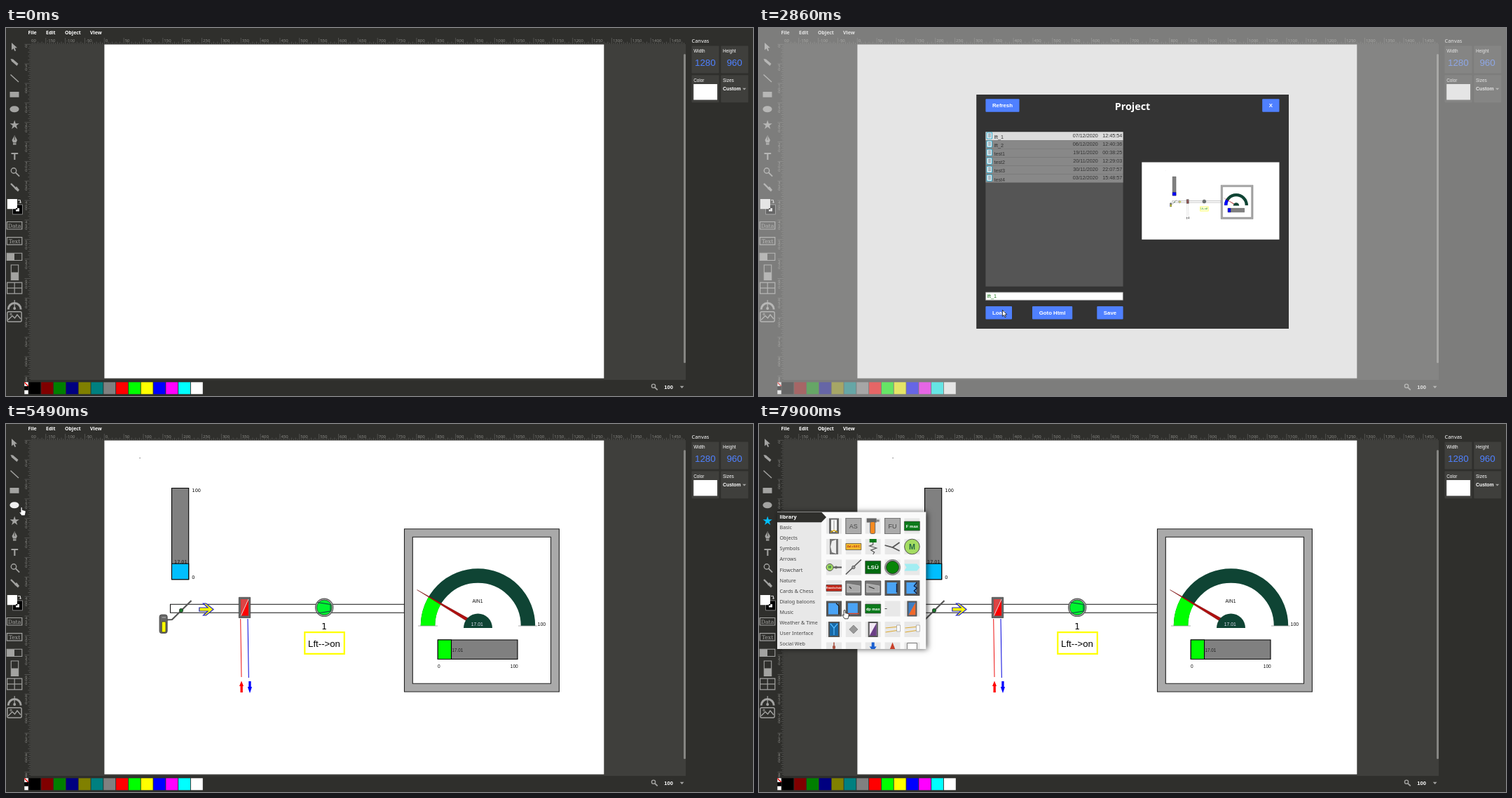
These frames come from a looping animation (1066 px wide and 525 px high, 8 s). An HTML page with a canvas:

```html
<!DOCTYPE html>
<html lang="en">
<head>
<meta charset="utf-8">
<title>Drawing editor</title>
<style>
html, body { margin: 0; width: 100%; height: 100%; overflow: hidden; background: #2f2f2c; }
canvas { display: block; }
</style>
</head>
<body>
<canvas width="1066" height="525"></canvas>
<script>
const c = document.querySelector('canvas').getContext('2d');
const NOTO = '"Noto Sans", "Open Sans", sans-serif';
const ARIAL = '"Liberation Sans", Arial, sans-serif';
const DEJA = '"DejaVu Sans", sans-serif';
const DARK = '#2f2f2c', TILE = '#3f3f3c', ICON = '#a3a3a1', BLUE = '#4f80ff', PINE = '#0f4434';
const TAU = Math.PI * 2;

function paint(fill, stroke, lw = 1) {
  if (fill) { c.fillStyle = fill; c.fill(); }
  if (stroke) { c.strokeStyle = stroke; c.lineWidth = lw; c.stroke(); }
}
// rectangle given by two corners
function rect(x, y, x2, y2, fill, stroke, lw, r = 0) {
  c.beginPath();
  c.roundRect(x, y, x2 - x, y2 - y, r);
  paint(fill, stroke, lw);
}
function poly(p, fill, stroke, lw, open) {
  c.beginPath();
  for (let i = 0; i < p.length; i += 2) c.lineTo(p[i], p[i + 1]);
  if (!open) c.closePath();
  paint(fill, stroke, lw);
}
const line = (p, stroke, lw) => poly(p, null, stroke, lw, true);
function oval(x, y, rx, ry, fill, stroke, lw) {
  c.beginPath();
  c.ellipse(x, y, rx, ry, 0, 0, TAU);
  paint(fill, stroke, lw);
}
const circle = (x, y, r, ...style) => oval(x, y, r, r, ...style);
function text(s, x, y, size, color, font = ARIAL, weight = 400, align = 'left') {
  c.font = `${weight} ${size}px ${font}`;
  c.textAlign = align;
  c.fillStyle = color;
  c.fillText(s, x, y);
}
function at(x, y, scale, draw) {
  c.save();
  c.translate(x, y);
  c.scale(scale, scale);
  draw();
  c.restore();
}
function button(label, x, y, x2, fill = BLUE) {
  rect(x, y, x2, y + 18.5, fill, null, 1, 1);
  text(label, (x + x2) / 2, y + 12, 7.8, '#fff', ARIAL, 700, 'center');
}

function rulers() {
  const step = 2.785, x0 = 140.3, y0 = 23.3;
  c.beginPath();
  for (let n = -37; n <= 297; n++) {
    const x = x0 + n * step;
    c.moveTo(x, n % 10 ? (n % 2 ? 21 : 19.5) : 14);
    c.lineTo(x, 23);
  }
  for (let n = 0; n <= 171; n++) {
    const y = y0 + n * step;
    c.moveTo(n % 10 ? (n % 2 ? 33 : 31.5) : 26.5, y);
    c.lineTo(35, y);
  }
  paint(null, '#6b6b68', 0.6);
  for (let n = -3; n <= 29; n++) text(n * 50, x0 + 1.5 + n * step * 10, 19.5, 6, '#8a8a86', NOTO);
  text('00', 36, 19.5, 6, '#8a8a86', NOTO);
  for (let n = 0; n <= 17; n++)
    [...String(n * 50)].forEach((d, k) => text(d, 27.2, y0 + 5 + n * step * 10 + k * 4.6, 5.5, '#8a8a86', NOTO));
}

function star(fill) {
  const p = [];
  for (let i = 0; i < 10; i++) {
    const a = i * Math.PI / 5, r = i % 2 ? 2.7 : 7;
    p.push(12.2 + r * Math.sin(a), 138.4 - r * Math.cos(a));
  }
  poly(p, fill);
}
function lens(x, y, r) {
  circle(x, y, r, null, ICON, 1.4);
  line([x + r * 0.7, y + r * 0.7, x + r * 2.2, y + r * 2.2], ICON, 1.8);
}

function tools(t) {
  poly([8, 21, 8, 31.5, 10.6, 29.3, 12.5, 33, 14.2, 32.2, 12.6, 28.6, 16, 28.3], ICON);
  poly([6.5, 44, 10, 44.5, 17.5, 51, 15.5, 54, 8, 47.5], ICON);
  line([6.5, 66.5, 18, 77], ICON, 1.5);
  rect(5.5, 91, 18.5, 98.8, ICON);
  oval(12, 115.7, 6.6, 4.5, t > 5450 && t < 5660 ? '#f0f0f0' : ICON);
  star(t >= 6040 ? '#00bfff' : t >= 5700 ? '#f0f0f0' : ICON);
  poly([12.2, 153, 16, 160, 14.5, 163.5, 10, 163.5, 8.5, 160], ICON);
  line([12.2, 154, 12.2, 160], DARK, 0.9);
  rect(10, 164.3, 14.5, 166.5, ICON);
  rect(7.5, 178, 17.2, 180, ICON);
  rect(11.3, 178, 13.4, 188, ICON);
  lens(11, 203.5, 3.7);
  line([7, 222, 15, 230], ICON, 2.4);
  poly([12, 229, 15, 226, 19, 231, 17, 233.5], ICON);
  rect(9.5, 252, 23.5, 265.8, '#000', '#999', 0.8);
  rect(1.8, 244, 16, 258.2, '#fff');
  rect(14, 257, 19, 261.5, '#fff');
  rect(14, 257, 16.3, 259, '#000');
  line([17, 245.5, 20.5, 245.5, 20.5, 249], '#ddd', 1);
  poly([19, 248, 22.2, 248, 20.6, 250], '#ddd');
  for (const [s, y] of [['Data', 276.5], ['Text', 298.7]]) {
    rect(1.3, y, 22.8, y + 10.5, null, ICON, 1.2);
    text(s, 12, y + 8.2, 7.8, ICON, '"DejaVu Serif", serif', 400, 'center');
  }
  rect(1.3, 321.3, 22.8, 331.5, null, ICON, 1.1);
  rect(1.3, 321.3, 12, 331.5, ICON);
  rect(7.3, 338, 17.7, 359.5, null, ICON, 1.1);
  rect(7.3, 348.5, 17.7, 359.5, ICON);
  rect(1.6, 363.2, 22.8, 378.8, null, ICON, 1.2);
  line([12.2, 363, 12.2, 379], ICON, 1.2);
  line([1.6, 371, 22.8, 371], ICON, 1.2);
  c.beginPath();
  c.arc(12.2, 401.5, 9, Math.PI, 0);
  paint(null, ICON, 3);
  line([12.2, 401.5, 12.2, 388], ICON, 1.2);
  circle(12.2, 400, 2, ICON);
  rect(1.8, 404.8, 22.2, 419, null, ICON, 1.4, 2);
  line([3, 416.5, 9, 410.5, 12.5, 414, 16, 409, 21, 415], ICON, 1.4);
  circle(7, 408.3, 1.2, null, ICON, 0.9);
}

function editor(t) {
  rect(0, 0, 1066, 525, DARK);
  rect(35, 23, 970, 502, TILE);
  rulers();
  rect(967, 37, 970, 478, '#858582', null, 1, 1.5);
  rect(140.4, 23.5, 853.3, 499.8, '#fff');
  ['File', 'Edit', 'Object', 'View'].forEach((s, i) => text(s, [31.5, 57, 84, 120][i], 8.5, 7, '#fff', NOTO, 600));
  tools(t);

  text('Canvas', 978.5, 21.3, 7.4, '#fff', NOTO);
  [978.5, 1020.3].forEach(x => {
    rect(x, 25.5, x + 39, 64.5, TILE, null, 1, 1);
    rect(x, 67.3, x + 39, 106.3, TILE, null, 1, 1);
  });
  text('Width', 981.2, 34.7, 6.4, '#fff');
  text('Height', 1023, 34.7, 6.4, '#fff');
  text('Color', 981.2, 76.5, 6.4, '#fff');
  text('Sizes', 1023, 76.5, 6.4, '#fff');
  text('1280', 997.8, 53.5, 13.3, BLUE, ARIAL, 400, 'center');
  text('960', 1039.5, 53.5, 13.3, BLUE, ARIAL, 400, 'center');
  rect(981.2, 80, 1015, 102.5, '#fff');
  text('Custom', 1023, 88.7, 6.9, '#fff', ARIAL, 700);
  poly([1051, 85.7, 1056.3, 85.7, 1053.6, 88.5], ICON);

  const colors = ['#000', '#800000', '#008000', '#000080', '#808000', '#008080', '#808080',
    '#f00', '#0f0', '#ff0', '#00f', '#f0f', '#0ff', '#fff'];
  colors.forEach((k, i) => rect(32.5 + i * 17.8, 505.3, 49.4 + i * 17.8, 522.3, k));
  rect(26.3, 505.3, 31.7, 511, '#fff');
  line([26.3, 505.5, 31.7, 511], '#f00', 1.2);
  rect(26.3, 511, 31.7, 516.5, '#000');
  rect(26.3, 516.8, 31.7, 522.3, '#fff');
  lens(924, 510.7, 2.6);
  text('100', 939.3, 514.5, 7.5, '#fff', ARIAL, 700);
  poly([961.7, 510.8, 967.5, 510.8, 964.6, 514], ICON);
}

function menu(hover) {
  c.save();
  c.shadowColor = 'rgba(0,0,0,.5)';
  c.shadowBlur = 5;
  rect(26, 13, 132, 110, '#f5f5f5');
  c.restore();
  rect(26, 0, 50, 14, '#f5f5f5');
  text('File', 31.5, 8.5, 7, '#333', NOTO);
  ['New Document', 'Open Project', 'Import Image', 'Save to Library', 'Export as PNG'].forEach((s, i) => {
    const y = 26 + i * 17.8;
    if (i === hover) rect(26, y - 8.9, 132, y + 8.9, BLUE);
    text(s, 40, y + 2.5, 7.3, i === hover ? '#fff' : '#333', NOTO);
  });
}

function gauge(live) {
  const x = 673.5, y = 288, a = Math.PI * 1.17;
  const band = (from, to, color) => {
    c.beginPath();
    c.arc(x, y, 71.5, from, to);
    paint(null, color, 20.5);
  };
  band(Math.PI, TAU, PINE);
  band(Math.PI, a, live ? '#0f0' : '#00f');
  line([588, 288, 616, 288], '#999', 0.8);
  line([731, 288, 758, 288], '#999', 0.8);
  c.save();
  c.translate(x, y);
  c.rotate(a);
  poly([101, 0, 10, -2.4, 10, 2.4], '#b01010', '#600', 0.4);
  c.restore();
  c.beginPath();
  c.arc(x, 291, 20.5, Math.PI, 0);
  paint(PINE);
  if (live) {
    text('AIN1', 673, 255, 6.8, '#111', ARIAL, 400, 'center');
    text('17.01', 672.3, 288, 6.8, '#dde', ARIAL, 400, 'center');
    text('100', 758.5, 288, 7, '#111');
  }
}

function scene(live) {
  rect(190.5, 48, 191.7, 49, '#555');
  rect(236.5, 91.5, 260.7, 221.7, '#808080', '#000', 1.1);
  rect(236.5, 199.3, 260.7, 221.7, live ? '#00bfff' : '#00f', '#000', 1.1);
  if (live) {
    text('17.01', 249.3, 198.7, 6.5, '#111', DEJA, 400, 'center');
    text('100', 265.5, 97, 6.5, '#000', DEJA);
    text('0', 265.3, 220.5, 6.5, '#000', DEJA);
  }
  rect(234.5, 257.3, 568.5, 269.3, '#fff', '#111', 1.1);

  // damper with its drive
  line([228, 279.5, 237, 279, 264.5, 252], '#555', 2.2);
  circle(250, 266, 2.7, '#1a7a2a', '#333', 0.8);
  rect(219, 272, 230.2, 298.5, '#666', '#444', 0.8, 3);
  rect(222.3, 282, 228, 297, '#ff0', '#333', 0.8, 1);
  line([222.5, 276, 228, 276], '#bbb', 1);

  poly([275.8, 262, 288, 262, 281.5, 256, 285.5, 256, 296, 264.5, 285.5, 273, 281.5, 273, 288, 267, 275.8, 267],
    '#ff0', '#22c', 1.2);

  // heater
  rect(332.3, 247.3, 348.7, 276.5, '#666', '#444', 0.8);
  rect(335.3, 250, 346, 273.5, live ? '#f00' : '#8b3a3a');
  poly([335.3, 250, 346, 250, 335.3, 273.5], live ? '#d44' : '#855');
  line([346, 250, 335.3, 273.5], '#ddd', 1);
  line([334.7, 278, 336, 361], live ? '#e11' : '#888', 1);
  line([345, 278, 346.3, 362], live ? '#00d' : '#888', 1);
  poly([336, 366.5, 339, 374, 337.8, 374, 337.8, 383, 334.5, 383, 334.5, 374, 333, 374], live ? '#f00' : '#222');
  poly([348, 384, 351, 375, 349.6, 375, 349.6, 367, 346.3, 367, 346.3, 375, 344.8, 375], live ? '#00f' : '#222');

  // fan
  circle(454.2, 261.8, 12.7, '#bbb', '#555', 1.1);
  circle(454.2, 261.8, 10.8, live ? '#00f52f' : '#777', '#333', 0.8);
  line([444.5, 254.5, 463, 257.5, 463, 267, 444.5, 270], '#144', 1.1);
  if (live) text('1', 454, 293, 12, '#000', DEJA, 400, 'center');
  rect(426.3, 297.2, 482.8, 327.8, live ? '#fff' : '#ffd', '#ff0', 2.2);
  text(live ? 'Lft-->on' : 'Lft-->off', 454, 317.5, 13.2, live ? '#000' : '#080', ARIAL, 400, 'center');

  rect(568.5, 149.7, 789.4, 382, '#a9a9a9', '#222', 1.1);
  rect(580.3, 161.3, 777.5, 370.3, '#fff', '#222', 1.1);
  gauge(live);
  rect(616.3, 308, 730, 335.5, '#808080', '#000', 1.1);
  rect(616.3, 308, 635.5, 335.5, live ? '#0f0' : '#00f', '#000', 1.1);
  if (live) {
    text('17.01', 636.5, 325, 6.3, '#222');
    text('0', 616, 347.7, 6.5, '#111');
    text('100', 730.7, 347.7, 6.5, '#111', ARIAL, 400, 'right');
  }
}

const files = [
  ['lft_1', '07/12/2020', '12:45:54'], ['lft_2', '06/12/2020', '12:40:36'], ['test1', '19/11/2020', '00:38:25'],
  ['test2', '20/11/2020', '12:29:03'], ['test3', '30/11/2020', '22:07:57'], ['test4', '03/12/2020', '15:48:57']];

function project(t) {
  rect(0, 0, 1066, 525, 'rgba(204,204,204,.5)');
  rect(310.2, 95, 756, 429, '#333');
  button('Refresh', 323.4, 101.2, 371.5);
  button('X', 718.2, 101.2, 742.5);
  text('Project', 533, 117, 14.4, '#fff', NOTO, 700, 'center');
  rect(323.4, 148.2, 519.6, 368.7, '#555');
  rect(323.4, 377, 519.4, 388.3, '#fff', '#888', 0.8);
  rect(546.3, 191.6, 742.5, 301.7, '#fff');
  button('Load', 323.4, 397, 361);
  button('Goto Html', 390, 397, 447.2);
  button('Save', 482.3, 397, 519.6);
  if (t >= 1780) files.forEach(([name, day, time], i) => {
    const y = 148.2 + i * 12.06;
    rect(323.4, y, 519.6, y + 12.06, i || t < 2320 ? '#888' : '#dcdcdc');
    rect(325, y + 0.8, 332.5, y + 9.8, '#e9f3f6', '#2aa5c9', 0.9);
    for (let k = 0; k < 3; k++) line([327, y + 3 + k * 2, 331, y + 3 + k * 2], '#567', 0.8);
    text(name, 335.5, y + 10, 7.2, '#333');
    text(day, 483.7, y + 7.3, 7.2, '#333', ARIAL, 400, 'right');
    text(time, 518.3, y + 7.3, 7.2, '#333', ARIAL, 400, 'right');
  });
  if (t >= 2400) {
    text('lft_1', 325.5, 385.3, 7.2, '#1a7a1a');
    at(540.9, 193, 0.208, () => scene(false));
  }
}

function confirmBox() {
  rect(0, 0, 1066, 525, 'rgba(0,0,0,.5)');
  rect(449.5, 217.3, 616.7, 300.8, '#fff', null, 1, 1);
  text('Are you sure to clear the current Project', 460.7, 235, 7.45, '#222', NOTO);
  text('and load the Project lft_1?', 460.7, 243.8, 7.45, '#222', NOTO);
  button('OK', 457.2, 278.2, 488);
  button('Cancel', 558.5, 281.6, 603.2, '#999');
}

// library icons, each drawn around the centre of its cell
const mid = (s, size, color, weight) => text(s, 0, size * 0.36, size, color, ARIAL, weight, 'center');
const panel = s => () => { rect(-11, -11, 11, 11, '#aaa', '#777', 1.2); mid(s, 9, '#444'); };
const tag = (s, size, fill = '#0b7a1b', h = 6.5, color = '#fff') => () => {
  rect(-11, -h, 11, h, fill, '#333', 0.6);
  mid(s, size, color, 700);
};
const motor = (x, r) => { circle(x, 0, r, '#a4dd62', '#555', 1); text('M', x, r * 0.34, r, '#264', ARIAL, 700, 'center'); };
const split = (a, b) => () => {
  rect(-7, -11, 7, 11, '#555');
  rect(-5, -9, 5, 9, a);
  poly([5, -9, 5, 9, -5, 9], b);
};
const flap = k => () => {
  rect(-11, -10, 11, 10, '#777', '#555', 1);
  poly([-9, -6, 9, -3, 9, 6, -9, 6], '#aaa', '#ccc', 0.7);
  line([-6, -2, -6 + k, 1], '#333', 1.2);
};
const unit = (p, color) => () => {
  rect(-11, -11, 11, 11, '#555');
  rect(-8, -8, 6, 8, '#4aa3f5');
  line(p, color, 1.5);
};
const slope = () => {
  line([-10, -2, 10, -4], '#da3', 1.2);
  line([-10, 4, 10, 1], '#da3', 1.2);
  rect(6, -6, 11, 3, '#fff', '#999', 0.7);
};
const icons = [
  () => { rect(-7, -11, 7, 11, '#666'); poly([-4, -9, 4, -9, 4, 6, 0, 9, -4, 6], '#fff'); line([-5, 9, 0, 6, 5, 9], '#da0', 1.4); line([0, -8, 0, 5], '#888', 1); },
  panel('AS'),
  () => { rect(-9, -11, 5, -5, '#666'); rect(-4, -6, 3, 11, '#f58a1f', '#666', 1, 2); rect(5, -9, 9, -6, '#888'); },
  panel('FU'),
  tag('F max', 6),
  () => { rect(-6, -11, 6, 11, '#777'); poly([-3, -8, 3, -10, 3, 10, -3, 8, -5, 0], '#eee'); },
  tag('Zul = 0.0 C', 3.6, '#f4b92d', 4.5, '#a11'),
  () => { rect(-5, -11, 5, -6, '#0b7a1b'); line([0, -6, 0, -3, -5, -1, 5, 2, -3, 5, 2, 8, 0, 11], '#555', 1.2); },
  () => { line([-11, -2, 0, 1, 10, -6], '#555', 1.8); line([0, 1, 10, 6], '#555', 1.8); },
  () => motor(0, 10.8),
  () => { line([-3, 0, 11, 0], '#555', 2); motor(-6, 5); circle(3, 0, 2, '#666'); },
  () => { line([-11, 10, 11, -11], '#555', 1.6); circle(0, 0, 2.2, '#999', '#444', 0.8); },
  tag('LSÜ', 8, '#006a10', 9),
  () => { circle(0, 0, 11, '#aaa', '#555', 0.8); circle(0, 0, 9, '#078507', '#222', 0.8); },
  () => poly([-11, -5, 7, -5, 11, 0, 7, 5, -11, 5, -8, 0], '#a2edf2'),
  tag('Brandschutz', 3.6, '#c22a1c', 4.5),
  flap(3), flap(8),
  unit([6, -6, 6, 6], '#124'),
  unit([7, -8, 3, -3, 7, 0, 3, 4, 7, 8], '#124'),
  unit([3, -8, 7, -4, 7, 8], '#222'),
  unit([-8, 7, 8, 7], '#d42'),
  tag('dp max', 5.6),
  () => line([-11, 0, -8, 0], '#444', 1),
  split('#3d7ec4', '#f0692a'),
  () => { rect(-8, -11, 8, 11, '#555'); rect(-6, -9, 6, 9, '#1769a8'); line([-5, -8, 0, -2, 5, -8], '#5bf', 1.2); line([0, -2, 0, 8], '#5bf', 1.2); },
  () => poly([0, -6, 6, 0, 0, 6, -6, 0], '#999', '#777', 0.8),
  split('#f2e8f4', '#6b3f86'),
  slope, slope,
  () => { line([0, -11, 0, 11], '#a54', 1.6); rect(-2, -6, 2, -2, '#a54'); },
  () => {},
  () => poly([-2, -11, 2, -11, 2, -5, 5, -5, 0, 2, -5, -5, -2, -5], '#1a5fd0'),
  () => poly([0, -11, 5, 2, -5, 2], '#c8402a'),
  () => rect(-7, -10, 7, 10, '#fff', '#777', 1)
];
const groups = ['Basic', 'Objects', 'Symbols', 'Arrows', 'Flowchart', 'Nature', 'Cards & Chess', 'Dialog baloons',
  'Music', 'Weather & Time', 'User Interface', 'Social Web'];

function library() {
  c.save();
  c.shadowColor = 'rgba(0,0,0,.7)';
  c.shadowBlur = 8;
  c.shadowOffsetX = 2;
  rect(26, 125.5, 238.3, 321, '#fafafa');
  c.restore();
  c.save();
  c.beginPath();
  c.rect(26, 125.5, 212.3, 195.5);
  c.clip();
  rect(26, 125.5, 89, 321, '#e8e8e8');
  poly([26, 125.5, 89, 125.5, 96, 133, 89, 140.2, 26, 140.2], DARK);
  text('library', 29.5, 135.3, 7.3, '#fff', NOTO, 700);
  groups.forEach((s, i) => text(s, 29.5, 150.4 + i * 15.03, 7.2, '#444', NOTO));
  icons.forEach((draw, i) => at(107 + i % 5 * 27.85, 145.5 + Math.floor(i / 5) * 29.5, 1, () => {
    rect(-11, -11, 11, 11, '#e8e8e8');
    draw();
  }));
  c.restore();
}

// pointer path: time, x, y
const path = [[80, 23, 0], [230, 28, 5], [1010, 28, 5], [1320, 51, 45], [1780, 51, 45], [2090, 338, 152],
  [2480, 340, 153], [2860, 347, 402], [3410, 347, 402], [3630, 481, 281], [3780, 481, 280], [4880, 481, 280],
  [5490, 21, 118], [5660, 21, 118], [5810, 14, 131], [6270, 14, 131], [7130, 126, 194], [7900, 121, 265], [8000, 121, 265]];

function pointer(t) {
  if (t < 80) return;
  const i = path.findIndex(k => k[0] > t), [t0, x0, y0] = path[i - 1], [t1, x1, y1] = path[i];
  const f = (t - t0) / (t1 - t0);
  at(x0 + (x1 - x0) * f, y0 + (y1 - y0) * f, 1, () => t < 5400
    ? poly([0.4, 0.4, 0.4, 9.3, 2.4, 7.5, 4, 10.8, 5.4, 10.1, 3.9, 7, 6.8, 6.7], '#fff', '#111', 0.8)
    : poly([0, 1, 1, 0.3, 2.2, 1, 2.2, 4.6, 6.5, 5.6, 7.3, 7, 6.6, 10.5, 6, 12.8, 1.2, 12.8, -2, 8.2, -1.5, 7, 0, 8.2],
      '#fff', '#111', 0.8));
}

function draw(t) {
  editor(t);
  if (t >= 4250) scene(t >= 4330);
  if (t >= 400 && t < 1780) menu(t >= 1550 || t < 1090 ? -1 : t < 1250 ? 0 : 1);
  if (t >= 1550 && t < 4250) project(t);
  if (t >= 3090 && t < 4250) confirmBox();
  if (t >= 6040) library();
  pointer(t);
}

const start = performance.now();
(function frame() {
  draw((performance.now() - start) % 8000);
  requestAnimationFrame(frame);
})();
</script>
</body>
</html>
```
